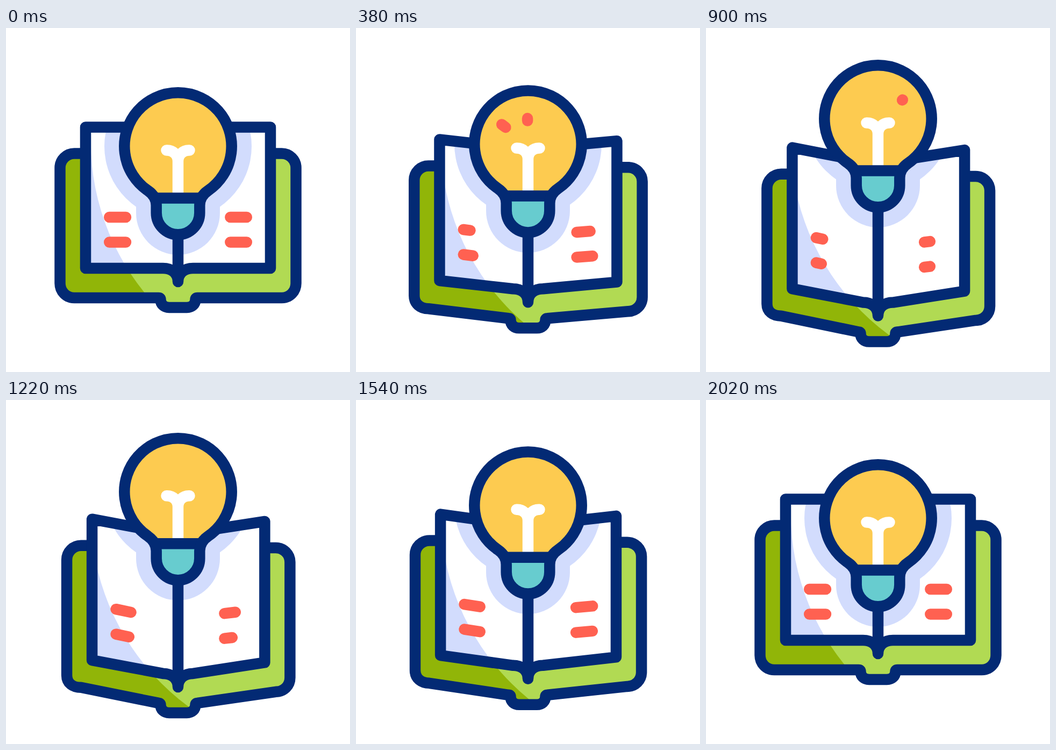
These frames come from a looping animation (640x640 px, 2.22 s). An HTML page:

```html
<!DOCTYPE html>
<html lang="en">
<head>
<meta charset="utf-8">
<title>Book and light bulb</title>
<style>
  html, body { margin: 0; width: 100%; height: 100%; overflow: hidden; background: #fff; }
  svg { display: block; width: 100vw; height: 100vh; }
  .ink { fill: none; stroke: #032a74; stroke-width: 20.5; stroke-linecap: round; stroke-linejoin: round; }
  .red { fill: none; stroke: #ff6151; stroke-width: 20.5; stroke-linecap: round; }
  .filament { fill: none; stroke: #fff; stroke-width: 20.5; stroke-linecap: round; }
  .halo { fill: #d2dcfd; }
</style>
</head>
<body>
<svg viewBox="0 0 640 640">
  <defs>
    <path id="cover"/>
    <path id="pages"/>
    <circle id="light" cx="605" cy="210.5" r="447.3"/>
    <path id="bulb" d="M264 302.5C272 308 279.7 317 279.7 330V344a40.3 40.3 0 0 0 80.6 0V330C360.3 317 368 308 376 302.5A99.7 99.7 0 1 0 264 302.5Z"/>
    <clipPath id="inCover"><use href="#cover"/></clipPath>
    <clipPath id="inPages"><use href="#pages"/></clipPath>
  </defs>

  <use href="#cover" fill="#91b508"/>
  <g clip-path="url(#inCover)"><use href="#light" fill="#b1da53"/></g>
  <path id="coverLine" class="ink"/>

  <use href="#pages" fill="#d2dcfd"/>
  <g clip-path="url(#inPages)">
    <use href="#light" fill="#fff"/>
    <g class="halo lift">
      <circle cx="320" cy="220" r="137"/>
      <path d="M242 330V344a78 78 0 0 0 156 0V330Z"/>
    </g>
  </g>
  <path id="lines" class="red"/>
  <use href="#pages" class="ink"/>

  <g class="lift">
    <use href="#bulb" fill="#fdcb50"/>
    <path d="M279.7 316.5V344a40.3 40.3 0 0 0 80.6 0V316.5Z" fill="#67cccf"/>
    <path class="filament" d="M298.5 227.5H300C311 227.5 320 236 320 248V308M341.5 227.5H340C329 227.5 320 236 320 248"/>
    <path class="ink" d="M279 316.5H361"/>
    <use href="#bulb" class="ink"/>
    <path id="rays" class="red"/>
  </g>
</svg>
<script>
const LOOP = 2220, HALF = 1005;
const $ = id => document.getElementById(id);
const clamp = x => Math.min(1, Math.max(0, x));
const mix = (a, b, k) => a + (b - a) * k;
const sine = x => (1 - Math.cos(Math.PI * clamp(x))) / 2;

// Cubic timing curve from (0,0) to (1,1) with handles (x1,0) and (x2,1)
function ease(x, x1, x2) {
  x = clamp(x);
  let lo = 0, hi = 1, s = x;
  for (let i = 0; i < 24; i++) {
    s = (lo + hi) / 2;
    const at = 3 * x1 * s * (1 - s) ** 2 + 3 * x2 * s * s * (1 - s) + s ** 3;
    if (at < x) lo = s; else hi = s;
  }
  return s * s * (3 - 2 * s);
}

function coverPath(p, d) {
  const l = 13 * p, r = -11.5 * p, ld = .6 * d, rd = .67 * d;
  return `M${148 + l} ${233.5 + ld}H${127 + l}A26.5 26.5 0 0 0 ${100.5 + l} ${260 + ld}V${475 + ld}` +
    `C${100.5 + l} ${490 + ld} ${112 + l} ${502 + .53 * d} ${127 + l} ${502 + .53 * d}` +
    `L284 ${502 + d}Q287.5 ${502 + d} 287.5 ${505 + d}C287.5 ${514 + d} 294 ${520 + d} 303.5 ${520 + d}` +
    `H336.5C346 ${520 + d} 352.5 ${514 + d} 352.5 ${505 + d}Q352.5 ${502 + d} 356 ${502 + d}` +
    `L${513 + r} ${502 + .66 * d}C${528 + r} ${502 + .66 * d} ${539.5 + r} ${490 + rd} ${539.5 + r} ${475 + rd}` +
    `V${260 + rd}A26.5 26.5 0 0 0 ${513 + r} ${233.5 + rd}H${492 + r}`;
}

// One page: outer edge at x, hinge near the spine
function pagePath(x, drop, hinge, d) {
  const bend = hinge < 320 ? 308 : 332;
  return `M320 ${184.5 + d}H${hinge}L${x} ${184.5 + drop}V${447 + drop}L${hinge} ${447 + d}` +
    `C${bend} ${447 + d} 320 ${456 + d} 320 ${472 + d}Z`;
}

function textLines(t, p, d) {
  let path = "";
  for (let i = 0; i < 4; i++) {
    const y = i % 2 ? 398.5 : 352, late = i * 100;
    const k = 1 - (sine((t - late) / 500) - sine((t - 780 - late) / 500)) * .66;
    const [x1, y1, x2, y2] = i < 2
      ? [192.2 + 12.8 * p, y + .6 * d, 223 + 10.5 * p, y + .6 * d + 6.2 * p]
      : [417.3 - 11.2 * p, y + .73 * d, 447.8 - 10.5 * p, y + .67 * d];
    path += `M${x1} ${y1}L${mix(x1, x2, k)} ${mix(y1, y2, k)}`;
  }
  return path;
}

// Each ray: direction, then [time, inner radius, outer radius]
const RAYS = [
  [-.8, -.6, [[100, 43, 43], [380, 52, 61], [520, 61, 61]]],
  [-.02, -1, [[210, 41, 41], [380, 43.5, 48], [580, 48.5, 56], [760, 58, 58]]],
  [.79, -.61, [[420, 42, 42], [580, 44.6, 51], [760, 50.5, 58], [920, 58, 58]]]
];

function rayPath(t) {
  let path = "";
  for (const [x, y, keys] of RAYS) {
    const i = keys.findIndex(k => k[0] > t);
    if (i < 1) continue;
    const [a, b] = [keys[i - 1], keys[i]], k = (t - a[0]) / (b[0] - a[0]);
    const from = mix(a[1], b[1], k), to = Math.max(from + .01, mix(a[2], b[2], k));
    path += `M${320 + x * from} ${220 + y * from}L${320 + x * to} ${220 + y * to}`;
  }
  return path;
}

const lifted = document.querySelectorAll(".lift");

function draw(t) {
  const m = Math.max(0, t < HALF ? t : 2 * HALF - t);
  const p = ease(m / HALF, .28, .26), d = 64 * p;
  const rise = 51.5 * ease((m - 315) / (HALF - 315), .25, .05);
  const cover = coverPath(p, d);
  $("cover").setAttribute("d", cover);
  $("coverLine").setAttribute("d", cover);
  $("pages").setAttribute("d",
    pagePath(148 + 12.5 * p, .6 * d, 292, d) + pagePath(492 - 11 * p, .67 * d, 348, d));
  $("lines").setAttribute("d", textLines(t, p, d));
  $("rays").setAttribute("d", rayPath(t));
  for (const g of lifted) g.setAttribute("transform", `translate(0 ${-rise})`);
}

const start = performance.now();
function tick() {
  draw((performance.now() - start) % LOOP);
  requestAnimationFrame(tick);
}
tick();
</script>
</body>
</html>
```
